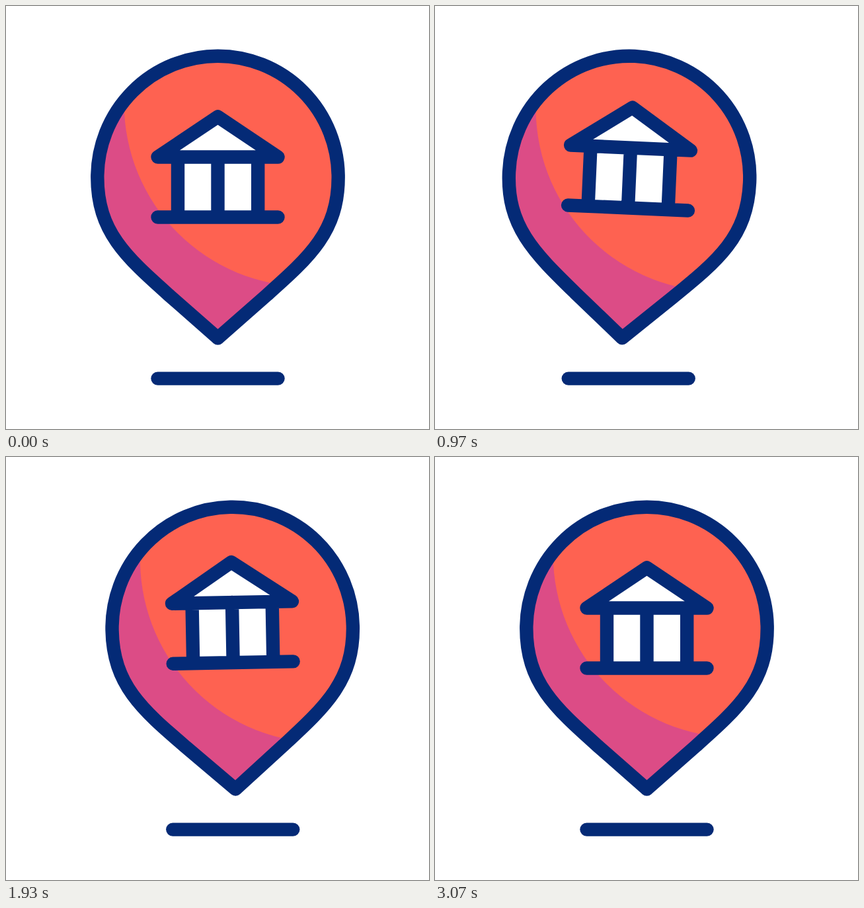
Animation, 640 px wide and 640 px high, one loop 3330 ms. Source, as an HTML page:

```html
<!DOCTYPE html>
<html lang="en">
<head>
<meta charset="utf-8">
<title>Bank location pin</title>
<style>
  html, body { margin: 0; width: 100%; height: 100%; overflow: hidden; background: #fff; }
  svg { display: block; width: 100vw; height: 100vh; }
  .line { fill: none; stroke: #042a76; stroke-width: 20.4; stroke-linecap: round; stroke-linejoin: round; }
</style>
</head>
<body>
<svg viewBox="0 0 640 640">
  <defs>
    <path id="drop" d="M138.3 259 A182.2 183.3 0 0 1 502.7 259 C502.7 341 460 379 395 437 L320.5 502.5 L246 437 C181 379 138.3 341 138.3 259Z"/>
    <clipPath id="inside"><use href="#drop"/></clipPath>
  </defs>
  <path id="ground" class="line" d="M229.5 563.6H411.5"/>
  <g id="pin">
    <use href="#drop" fill="#dc4c86"/>
    <g clip-path="url(#inside)">
      <circle id="light" cx="455.7" cy="147.5" r="277" fill="#fe6251"/>
    </g>
    <use href="#drop" class="line"/>
    <g id="bank">
      <path fill="#fff" d="M260 228.5H381V319.5H260ZM320.5 167.5L411.5 228.5H229.5Z"/>
      <path class="line" d="M320.5 167.5L411.5 228.5H229.5ZM260 228.5V319.5M320.5 228.5V319.5M381.2 228.5V319.5M229.5 319.5H411.5"/>
    </g>
  </g>
</svg>
<script>
  const LOOP = 3330, STEP = 100 / 3;
  const CENTRE = '320.5 289';

  // Swing sizes; the direction alternates from one to the next.
  const SLIDES = [69, 84, 31, 46.5, 18, 27.5, 10.3];
  const BOBS = [37, 14.3, 7.7, 10.4, 24.5];

  const listed = sizes => i => sizes[i] || 0;
  const fading = (size, rate, count) => i => i < count ? size * rate(i) : 0;

  const tiltSize = fading(10, i => 0.6 ** Math.floor(i / 2), 8);
  const turnSize = fading(14, i => 0.9 ** i, 7);

  // Eased swing from side to side, starting and ending at rest.
  function swing(n, delay, span, size) {
    const peak = i => i < 0 ? 0 : size(i) * (i % 2 ? -1 : 1);
    const beat = Math.max(0, (n - delay) / span);
    const i = Math.floor(beat), x = beat - i;
    return peak(i - 1) + (peak(i) - peak(i - 1)) * x * x * (3 - 2 * x);
  }

  const place = (id, transform) =>
    document.getElementById(id).setAttribute('transform', transform);

  function draw(time) {
    const n = Math.floor((time % LOOP + 5) / STEP);
    const slide = -swing(n, 0, 10, listed(SLIDES));
    const tilt = swing(n, 2, 10, tiltSize);
    const turn = swing(n, 4, 10, turnSize);
    const bob = swing(n, 0, 14, listed(BOBS));
    const sag = 3.5 * Math.sin(Math.PI * Math.min(1, n / 92));
    place('ground', `translate(${slide} 0)`);
    place('pin', `translate(${slide} 0) rotate(${tilt} ${CENTRE})`);
    place('bank', `translate(0 ${bob})`);
    place('light', `rotate(${turn} ${CENTRE}) translate(${-sag} ${sag})`);
  }

  const start = performance.now();
  function tick() {
    draw(performance.now() - start);
    requestAnimationFrame(tick);
  }
  tick();
</script>
</body>
</html>
```
